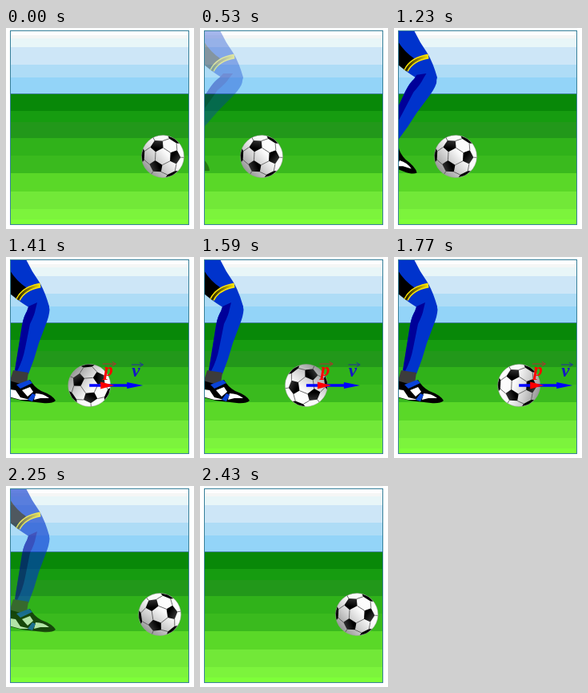
Animation of 235x252 px, one loop 3.49 s. Source, as an HTML page:

```html
<!DOCTYPE html>
<html lang="en">
<head>
<meta charset="utf-8">
<title>Kick</title>
<style>
html, body { margin: 0; width: 100%; height: 100%; overflow: hidden; background: #fff; }
svg { display: block; }
text { font: italic bold 23px "Liberation Serif", "Times New Roman", serif; }
</style>
</head>
<body>
<svg width="235" height="252" viewBox="0 0 235 252">
  <defs>
    <clipPath id="stage"><rect x="5" y="3" width="224" height="244"/></clipPath>
    <clipPath id="disc"><circle r="26.7"/></clipPath>
    <linearGradient id="leather" x1=".1" y1=".9" x2=".9" y2=".1">
      <stop offset="0" stop-color="#8c8c8c"/>
      <stop offset=".35" stop-color="#d0d0d0"/>
      <stop offset=".6" stop-color="#fafafa"/>
      <stop offset="1" stop-color="#fff"/>
    </linearGradient>
    <linearGradient id="patch" x1="0" y1="0" x2="1" y2="1">
      <stop offset=".3" stop-color="#000"/>
      <stop offset="1" stop-color="#444"/>
    </linearGradient>
    <linearGradient id="band" x1="0" x2="1">
      <stop offset="0" stop-color="#2a2600"/>
      <stop offset=".5" stop-color="#8a7c00"/>
      <stop offset="1" stop-color="#ffe600"/>
    </linearGradient>
    <g id="third">
      <path d="M9.3-5.35 17.4-8.7 22.4 0 17.4 8.7 9.3 5.35z" fill="url(#patch)"/>
      <path d="M23.1-5.35 25-8.7 27 0 25 8.7 23.1 5.35z" transform="rotate(60)"/>
      <g fill="none" stroke="#555" stroke-width=".8">
        <path d="M22.4 0H27M9.3 5.35 0 10.7M17.4 8.7 16.2 17.3M17.4-8.7 16.2-17.3"/>
      </g>
    </g>
  </defs>

  <g clip-path="url(#stage)">
    <g id="bands" shape-rendering="crispEdges"></g>

    <g id="leg">
      <path fill="#0033cc" d="M5 3H25Q32 18 42 32 49 44 54 62L52 70 34 66Q26 62 15 54L5 40z"/>
      <path d="M5 17Q13 30 25 38L15 54 5 46z"/>
      <g fill="none">
        <path stroke="#ffe600" stroke-width="6" d="M15 53.5Q22 39 43 35.5"/>
        <path stroke="url(#band)" stroke-width="3" d="M15 53.5Q22 39 43 35.5"/>
      </g>
      <g id="shin">
        <path fill="#0033cc" d="M31 57 44 52Q54 57 54.5 66 54 74 50 84L41 108 35 128 28 147 11 143 16 112 20 86Q22 73 27 67z"/>
        <path fill="#000099" d="M39 57 28 62 26 68Q21 77 19 92L11 142 14 143Q21 130 24 114L30 84Q36 72 37 65z"/>
        <path fill="#3c3c3c" d="M9 142 28 145 26 158 19 161 4 158z"/>
        <path d="M4 155 18 159 30 154Q35 163 44 168 58 173 62 180 58 184 46 183L20 180-4 174-2 160z"/>
        <path fill="#fff" d="M-3 165 12 167 18 176 30 179 18 179-4 173zM37 171Q47 171 54 177L43 177 35 179zM20 167 30 163 34 169 27 175z"/>
        <path fill="#0a43d8" d="M13 160 29 154 33 158 18 165zM27 179 33 171 37 173 33 181z"/>
      </g>
    </g>

    <g id="ball">
      <g id="spin" clip-path="url(#disc)">
        <circle r="26.7" fill="url(#leather)"/>
        <use href="#third"/>
        <use href="#third" transform="rotate(120)"/>
        <use href="#third" transform="rotate(240)"/>
      </g>
      <circle r="26.5" fill="none" stroke="#999" stroke-width=".5"/>
      <g id="vectors" stroke-width="1" stroke-linecap="round">
        <path fill="#00f" d="M0-1.8H47V-4L67 0 47 4V1.8H0z"/>
        <text x="53" y="-11" fill="#1414c8">v</text>
        <path fill="none" stroke="#22329a" d="M53-26H67M63-28.5 67-26 63-23.5"/>
        <path fill="#f00" d="M14-4.5 31 0 14 4.5z"/>
        <text x="18" y="-12" fill="#f00">p</text>
        <path fill="none" stroke="#b03030" d="M17-27H33M29-29.5 33-27 29-24.5"/>
      </g>
    </g>
  </g>
  <rect x="5.5" y="3.5" width="223" height="243" fill="none" stroke="#37809a"/>
</svg>
<script>
const $ = id => document.getElementById(id);
const LOOP = 3490, STEP = 60;
const START_X = 77, END_X = 196, BALL_Y = 161;

const bands = [
  [3, '#fefefe'], [9, '#f5f6f5'], [13, '#e8f6f8'], [24, '#cde6f7'], [46, '#aedcf6'], [62, '#93d4f8'],
  [82, '#4484a0'], [83, '#088808'], [104, '#169c10'], [118, '#22981a'], [138, '#30b21a'],
  [160, '#3aba1e'], [182, '#5ad828'], [205, '#72e838'], [227, '#7cf43c'], [240, '#7eff38']
];
$('bands').innerHTML = bands.map(([y, color], i) => {
  const bottom = i + 1 < bands.length ? bands[i + 1][0] : 247;
  return `<rect x="5" y="${y}" width="224" height="${bottom - y}" fill="${color}"/>`;
}).join('');

const clamp = x => Math.min(1, Math.max(0, x));
const steps = (t, from) => Math.floor((t - from) / STEP);

function legOpacity(t) {
  if (t < 530 || t >= 2430) return 0;
  return t < 2070 ? clamp(.35 + .13 * steps(t, 530)) : 1 - .13 * steps(t, 2070);
}

function travel(t) {
  if (t < 530 || t >= 2430) return 1;
  const u = clamp((1230 + STEP * steps(t, 1230) - 1264) / 1200);
  return 1 - (1 - u) ** 2;
}

function draw(now) {
  const t = now % LOOP;
  const swing = clamp((steps(t, 1230) + 1) / 3);
  const roll = travel(t);
  $('leg').setAttribute('opacity', legOpacity(t));
  $('shin').setAttribute('transform', `rotate(${24 * (1 - swing)} 40 62)`);
  $('ball').setAttribute('transform', `translate(${START_X + (END_X - START_X) * roll} ${BALL_Y})`);
  $('spin').setAttribute('transform', `rotate(${3 + 360 * roll})`);
  $('vectors').setAttribute('visibility', t >= 1290 && t < 2130 ? 'visible' : 'hidden');
}

const begin = performance.now();
function tick() {
  draw(performance.now() - begin);
  requestAnimationFrame(tick);
}
tick();
</script>
</body>
</html>
```
